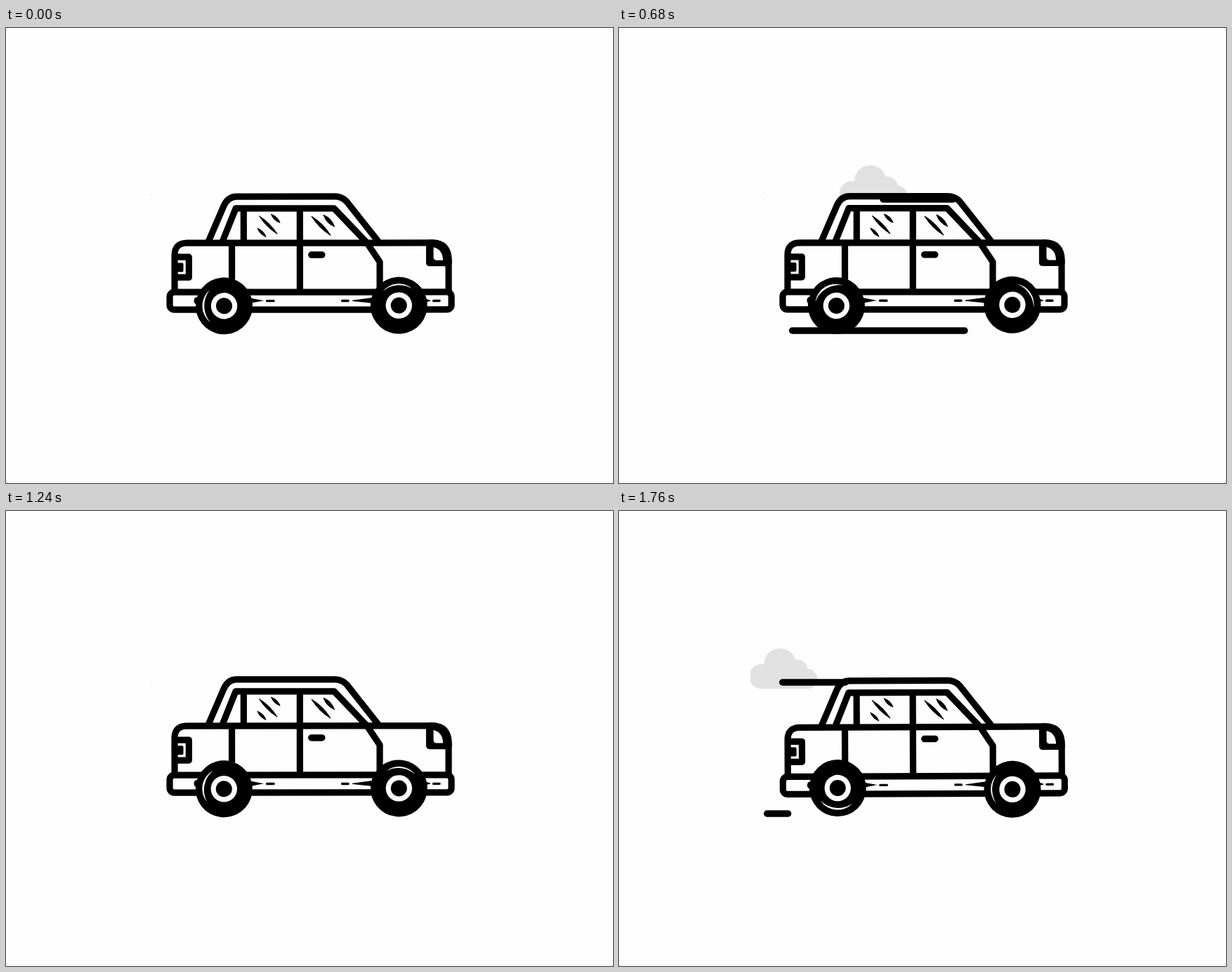
An HTML page that plays this animation: 864x648 px, repeating every 1.8 s.

```html
<!DOCTYPE html>
<html lang="en">
<head>
<meta charset="utf-8">
<title>Driving car</title>
<style>
  html, body { margin: 0; width: 100%; height: 100%; overflow: hidden; background: #fefefe; }
  svg { display: block; width: 100vw; height: 100vh; }
  .ink { fill: none; stroke: #000; stroke-width: 9.2; stroke-linejoin: round; }
  .white { fill: #fefefe; }
</style>
</head>
<body>
<svg viewBox="0 0 864 648">
  <defs>
    <clipPath id="sky"><rect x="187" y="180" width="491" height="90"/></clipPath>
    <g id="wheel">
      <circle r="40.5"/>
      <circle r="18.7" class="white"/>
      <circle r="11.5"/>
    </g>
  </defs>
  <rect y="645.5" width="864" height="2.5" fill="#f8f8f8"/>
  <rect x="205.5" y="243" width="1" height="2" fill="#ddd"/>

  <g clip-path="url(#sky)">
    <g id="cloud" fill="#e1e1e1">
      <circle cx="17.5" cy="235.7" r="17.5"/>
      <circle cx="44" cy="218" r="22.6"/>
      <circle cx="68" cy="227" r="15.5"/>
      <circle cx="82.7" cy="239" r="14.3"/>
      <rect x="17" y="230" width="66" height="23.3"/>
    </g>
  </g>

  <g id="car">
    <g class="ink">
      <path class="white" d="M288 304 310 253Q316 239.7 328 239.7H468Q478 239.7 485 247L530 304"/>
      <path class="white" d="M240 376V323Q240 305.8 258 305.8H606Q630 305.8 630 331V376"/>
      <path d="M308 304 327 256.6H467L514 306 532 333V374"/>
      <path d="M338.3 257V304M418.3 257V376M321.5 306V358"/>
      <path d="M240 325.8H260.3V354.8H240"/>
      <path d="M602.5 306V334.5H630V331Q630 305.8 606 305.8Z" fill="#000"/>
      <rect class="white" x="233" y="375.8" width="401" height="25" rx="6.5"/>
    </g>
    <path class="white" d="M608.5 312Q621.5 315 622 330.5H613Q608.5 330.5 608.5 326Z"/>
    <rect x="430" y="318" width="24.5" height="9.5" rx="4.7"/>
    <rect x="243" y="334" width="9.5" height="13" rx="2"/>
    <ellipse cx="271" cy="388" rx="3.5" ry="5"/>
    <path d="M346 384 367 388 346 392ZM524 383.5 493 387.6V388.8L524 392ZM596 385 605 388 596 391Z"/>
    <path d="M371.5 388.3H381M478.5 388.3H487M608.5 388.3H617" stroke="#000" stroke-width="3.4" stroke-linecap="round"/>
    <path id="glints" stroke="#000" stroke-linejoin="round"/>
  </g>

  <g id="rear"><use href="#wheel"/><path class="white"/></g>
  <g id="front"><use href="#wheel"/><path class="white"/></g>
  <g id="streaks" stroke="#000" stroke-width="9.4" stroke-linecap="round"></g>
</svg>
<script>
const LOOP = 1800, STEP = 40;
const $ = id => document.getElementById(id);
const clamp = v => Math.max(0, Math.min(1, v));
const ease = v => { const u = clamp(v); return u * u * (3 - 2 * u); };
const mix = (a, b, k) => a + (b - a) * k;
const rad = deg => deg * Math.PI / 180;

// Pointed sliver between two points, w wide in the middle
function sliver(x1, y1, x2, y2, w) {
  const len = Math.hypot(x2 - x1, y2 - y1);
  const nx = (y1 - y2) / len * w, ny = (x2 - x1) / len * w;
  const mx = (x1 + x2) / 2, my = (y1 + y2) / 2;
  return `M${x1} ${y1}Q${mx + nx} ${my + ny} ${x2} ${y2}Q${mx - nx} ${my - ny} ${x1} ${y1}Z`;
}
$('glints').setAttribute('d', [
  [377.5, 265, 390, 277, 4], [360.5, 267.5, 386, 293, 4], [358, 285, 370, 297, 3.5],
  [435, 268, 462, 295, 4.5], [452, 266, 467.5, 282.5, 5]
].map(g => sliver(...g)).join(''));

// Crescent highlight centred on the given angle, tapering at both ends
function crescent(mid, span) {
  const end = deg => `${30.5 * Math.cos(rad(deg))} ${30.5 * Math.sin(rad(deg))}`;
  const a = end(mid - span / 2), b = end(mid + span / 2);
  return `M${a}A29.5 29.5 0 0 1 ${b}A36 36 0 0 0 ${a}Z`;
}
$('rear').lastChild.setAttribute('d', crescent(-86, 98));
$('front').lastChild.setAttribute('d', crescent(0, 86));

// Each streak: height, path ends, then start and length of the head's and tail's run
const streaks = [
  { y: 244, from: 480, to: 210.5, head: [375, 340], tail: [498, 282] },
  { y: 268.5, from: 480, to: 235, head: [288, 118], tail: [304, 131] },
  { y: 342.5, from: 490, to: 250, head: [287, 150], tail: [299, 160] },
  { y: 431, from: 654.3, to: 210.7, head: [212, 372], tail: [390, 315] }
];
for (const s of streaks) {
  s.el = document.createElementNS('http://www.w3.org/2000/svg', 'line');
  s.el.setAttribute('y1', s.y);
  s.el.setAttribute('y2', s.y);
  $('streaks').append(s.el);
}

// Wheels turn slightly off centre
function placeWheel(id, x, y, angle, phase) {
  const a = rad(angle + phase), wobble = 1.1;
  const cx = x + wobble * Math.cos(a), cy = y + wobble * Math.sin(a);
  $(id).setAttribute('transform', `translate(${cx} ${cy}) rotate(${angle})`);
}

function draw(t) {
  const drive = Math.max(t, 30);
  const dip = (1 - Math.cos((drive - 72) / 600 * 2 * Math.PI)) / 2;
  $('car').setAttribute('transform', `translate(0 ${5.9 * dip}) rotate(${-0.8 * dip} 434 300)`);

  const angle = 265 + 1.2 * (drive - 30);
  placeWheel('rear', 310.2, 394.7, angle, -190);
  placeWheel('front', 560.3, 395.3, angle, -75);

  // Scenery passes twice; the loop cuts the second pass short
  const pass = t < 1105 ? t - 161 : t - 1105;
  $('cloud').setAttribute('transform', `translate(${mix(720, 90, ease(pass / 868))} 0)`);
  for (const { el, from, to, head, tail } of streaks) {
    const shown = pass > head[0] && pass < tail[0] + tail[1] + 25;
    el.setAttribute('visibility', shown ? 'visible' : 'hidden');
    el.setAttribute('x1', mix(from, to, ease((pass - head[0]) / head[1])));
    el.setAttribute('x2', mix(from, to, ease((pass - tail[0]) / tail[1])) + 0.01);
  }
}

const start = performance.now();
function tick() {
  const t = (performance.now() - start) % LOOP;
  draw(Math.floor(t / STEP) * STEP);
  requestAnimationFrame(tick);
}
tick();
</script>
</body>
</html>
```
